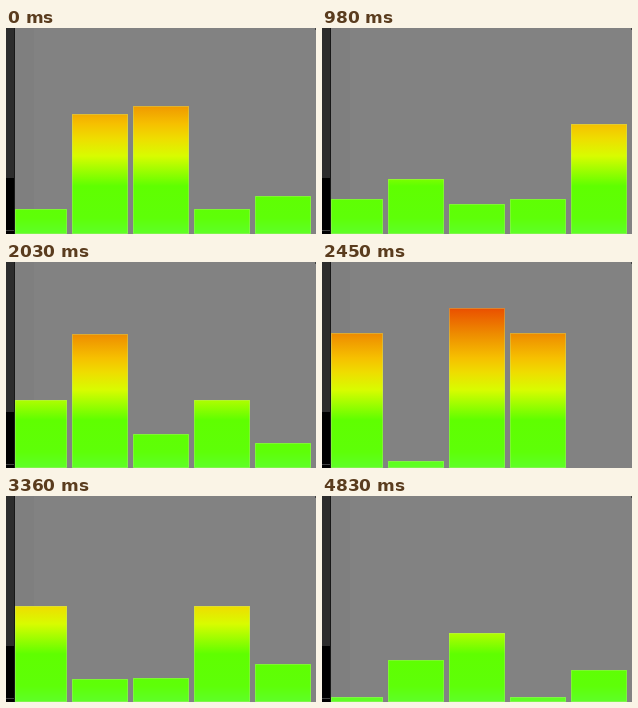
An HTML page with a canvas that plays this animation: 310x206 px, repeating every 4.9 s.

```html
<!DOCTYPE html>
<html lang="en">
<head>
<meta charset="utf-8">
<title>Equalizer</title>
<style>
  html, body { margin: 0; width: 100%; height: 100%; overflow: hidden; background: #828282; }
  canvas { display: block; }
</style>
</head>
<body>
<canvas id="stage" width="310" height="206"></canvas>
<script>
const W = 310, H = 206, STEP = 70, STEPS = 70;
const PEAK = 5, SWING = 95, PITCH = 61, BAR_WIDTH = 56, LEFT = 9;
const ctx = document.getElementById('stage').getContext('2d');

// Key poses: the top edge of each of the four channels.
const poses = [
  { step: 0, tops: [181, 86, 78, 168] },
  { step: 14, tops: [171, 151, 176, 96] },
  { step: 29, tops: [138, 72, 172, 181] },
  { step: 42, tops: [145, 201, 44, 166] },
  { step: 48, tops: [110, 183, 182, 168] },
  { step: 58, tops: [99, 39, 206, 10] },
  { step: 69, tops: [201, 164, 137, 174] }
];
const channels = [0, 1, 2, 0, 3];

const heat = ctx.createLinearGradient(0, 0, 0, H);
for (const [y, color] of [
  [0, '#e41c00'], [24, '#e62000'], [44, '#ea4a00'], [72, '#ee8c00'],
  [96, '#f6c000'], [110, '#efdc00'], [128, '#d8fc00'],
  [158, '#5fff00'], [190, '#5eff08'], [206, '#5eff28']
]) heat.addColorStop(y / H, color);

// Ease from pose to pose, with a swing that settles to zero at each pose.
function topAt(channel, step) {
  const next = Math.max(1, poses.findIndex(pose => pose.step >= step));
  const from = poses[next - 1], to = poses[next];
  const span = to.step - from.step;
  const t = (step - from.step) / span;
  const ease = (1 - Math.cos(Math.PI * t)) / 2;
  const base = from.tops[channel] + (to.tops[channel] - from.tops[channel]) * ease;
  const halfWaves = Math.max(2, Math.round(span / 4));
  const direction = (channel + next) % 2 ? 1 : -1;
  const swing = direction * SWING * (1 - t * t) * Math.sin(Math.PI * halfWaves * t);
  return Math.round(Math.min(H, Math.max(PEAK, base + swing)));
}

function rect(color, x, y, width, height) {
  ctx.fillStyle = color;
  ctx.fillRect(x, y, width, height);
}

function drawBackdrop() {
  rect('#828282', 0, 0, W, H);
  rect('#7f7f7f', LEFT, 0, 19, H);
  rect('#2d2d2d', 0, 0, 8, 150);
  rect('#000', 0, 150, 8, 56);
  rect('#444', 0, 202, 8, 1);
  rect('#181818', 8, 0, 1, H);
  rect('#444', 309, 0, 1, 2);
}

function drawBar(channel, index, step) {
  const top = topAt(channel, step);
  if (top >= H) return;
  const right = LEFT - 4 + index * PITCH + BAR_WIDTH;
  const left = Math.max(LEFT, right - BAR_WIDTH);
  rect(heat, left, top, right - left, H - top);
  ctx.strokeStyle = 'rgba(190, 225, 140, 0.35)';
  ctx.strokeRect(left + 0.5, top + 0.5, right - left - 1, H - top - 1);
}

function draw(now) {
  const step = Math.floor(now / STEP) % STEPS;
  drawBackdrop();
  channels.forEach((channel, index) => drawBar(channel, index, step));
}

const start = performance.now();
function tick() {
  draw(performance.now() - start);
  requestAnimationFrame(tick);
}
tick();
</script>
</body>
</html>
```
